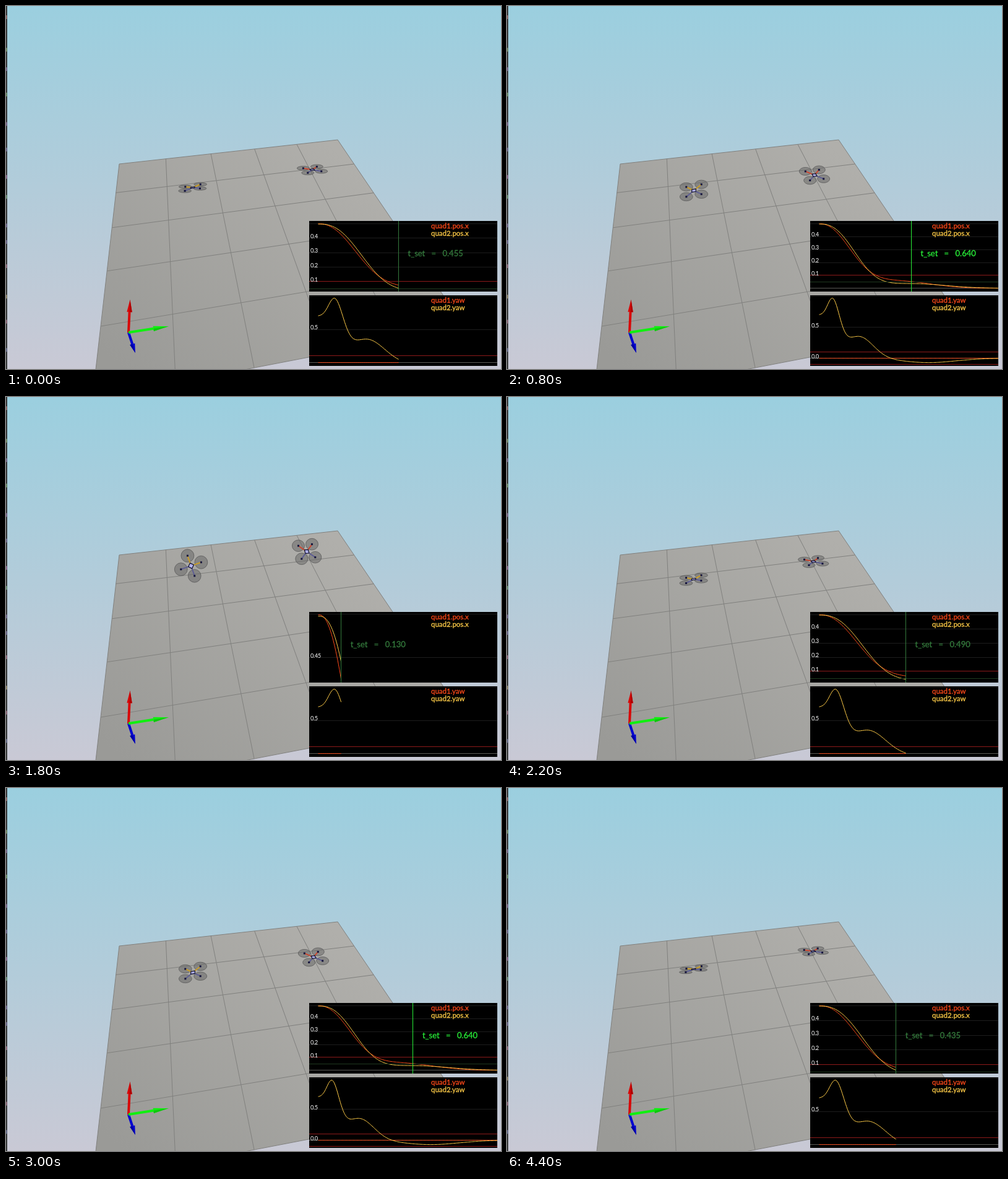
Animation, 800 px wide and 586 px high, one loop 4.5 s. Source, as an HTML page:

```html
<!DOCTYPE html>
<html lang="en">
<head>
<meta charset="utf-8">
<title>Two quadcopters settling</title>
<style>
  html, body { margin: 0; width: 100%; height: 100%; overflow: hidden; background: #9ccfe0; }
  svg { display: block; width: 800px; height: 586px; }
  text { font-family: Lato, "Open Sans", sans-serif; stroke: currentColor; fill: currentColor; stroke-width: .3px; }
  .legend { font-size: 11.5px; }
  .readout { font-size: 13px; }
  .tick { font-size: 9.3px; letter-spacing: -.4px; color: #fff; stroke: none; }
  .plot path, .plot rect { fill: none; shape-rendering: crispEdges; }
  .plot .trace { shape-rendering: auto; }
</style>
</head>
<body>
<svg viewBox="0 0 800 586">
  <defs>
    <linearGradient id="sky" x1="0" y1="0" x2="0" y2="1">
      <stop offset="0" stop-color="#9bcfdf"/>
      <stop offset="1" stop-color="#c9c9d5"/>
    </linearGradient>
    <linearGradient id="ground" gradientUnits="userSpaceOnUse" x1="520" y1="220" x2="190" y2="586">
      <stop offset="0" stop-color="#b0afab"/>
      <stop offset="1" stop-color="#9a9a97"/>
    </linearGradient>
    <clipPath id="clipPos"><rect x="490" y="347" width="304" height="114"/></clipPath>
    <clipPath id="clipYaw"><rect x="490" y="467" width="304" height="114"/></clipPath>
  </defs>
  <rect width="800" height="586" fill="url(#sky)"/>
  <rect width="2" height="586" fill="#363839"/>
  <g id="marks"></g>
  <g id="floor"></g>
  <g id="axes"></g>
  <g id="drones"></g>
  <g id="plots"></g>
</svg>
<script>
const $ = id => document.getElementById(id);
const RED = '#ff4a1a', YELLOW = '#ffcc48', GREEN = '#28f038', DIM_GREEN = '#347a3c', DARK_RED = '#8c1a1a';
const LOOP = 4500, STEP = 100, ENTER = .1, HOLD = 1.4, SETTLED = .64;

const mix = (a, b, s) => a + (b - a) * s;
const bell = (t, center, width) => Math.exp(-(((t - center) / width) ** 2));

// Response curves against simulated seconds: a fast fall plus a slow tail.
const fall = (t, scale, power) => .497 * Math.exp(-((t / scale) ** power));
const pos1 = t => fall(t, .28, 2.25) + .056 * bell(t, .55, .31);
const pos2 = t => fall(t, .301, 2.55) + .036 * bell(t, .64, .33);
const yaw1 = () => 0;
const yaw2 = t => {
  const peak = .087;
  const swing = t < peak ? mix(.695, .912, bell(t, peak, .042)) : .912 * bell(t, peak, .075);
  return swing + .355 * bell(t, .275, .14) - .07 * bell(t, .76, .27);
};

// How open the rotor discs look: dive forward, brake backward, then level.
const LEVEL = .65;
const tilt = t => LEVEL + .38 * bell(t, .12, .07) - .46 * bell(t, .39, .15);

// Each run restarts the simulation at a given moment of the loop.
const runs = [
  { at: 0, from: .455, rate: .9875 },
  { at: 1700, from: .04, rate: .9 },
  { at: 4000, from: .075, rate: .9 }
];
function simTime(ms) {
  const run = runs.filter(r => r.at <= ms).pop();
  return Math.round((run.from + run.rate * (ms - run.at) / 1000) * 200) / 200;
}

function drawMarks() {
  let seed = 7;
  const random = () => (seed = seed * 16807 % 2147483647) / 2147483647;
  let out = '';
  for (let y = 15; y < 580; y += 25 + 30 * random())
    out += `<rect y="${y}" width="1.5" height="6" fill="hsl(${360 * random()} 20% 55%)"/>`;
  $('marks').innerHTML = out;
}

function drawFloor() {
  const project = (u, v) => {
    const w = 1 + .085 * u - .4425 * v;
    return [(183 + 398.6 * u - 105.2 * v) / w, (255 - 20.6 * u + 98.7 * v) / w];
  };
  let grid = '';
  for (let i = 0; i <= 5; i++) {
    const s = i / 5;
    grid += `M${project(s, 0)}L${project(s, 1)}M${project(0, s)}L${project(1, s)}`;
  }
  const corners = [project(0, 0), project(1, 0), project(1, 1), project(0, 1)].join(' ');
  $('floor').innerHTML = `<polygon points="${corners}" fill="url(#ground)"/>
    <path d="${grid}" fill="none" stroke="#80807e"/>`;
}

function arrow(x, y, headLength, color, shade) {
  const ox = 198, oy = 527, half = 4.2, len = Math.hypot(x - ox, y - oy);
  const dx = (x - ox) / len, dy = (y - oy) / len;
  const bx = x - dx * headLength, by = y - dy * headLength;
  const nx = -dy * half, ny = dx * half;
  return `<path d="M${ox} ${oy}L${bx} ${by}" stroke="${color}" stroke-width="4"/>
    <path d="M${x} ${y}L${bx + nx} ${by + ny}L${bx - nx} ${by - ny}Z" fill="${color}"/>
    <path d="M${x} ${y}L${bx + nx} ${by + ny}L${bx} ${by}Z" fill="${shade}"/>`;
}

function drone(center, right, front, radius, ratio, color) {
  const [cx, cy] = center;
  const at = (r, f, k = 1) =>
    [cx + k * (r * right[0] + f * front[0]), cy + k * (r * right[1] + f * front[1])];
  const places = [[-1, 1], [1, 1], [1, -1], [-1, -1]];
  const each = draw => places.map(([r, f]) => draw(at(r, f), f > 0)).join('');
  const discs = each(([x, y]) =>
    `<ellipse cx="${x}" cy="${y}" rx="${radius}" ry="${radius * ratio}" fill="#606060" fill-opacity=".48" stroke="#5a5a5a" stroke-width=".8"/>`);
  const arms = each((p, isFront) =>
    `<path d="M${center}L${p}" stroke="${isFront ? color : '#5c5c96'}" stroke-width="1.8"/>`);
  const motors = each(([x, y]) =>
    `<rect x="${x - 1.5}" y="${y - 1.5}" width="3" height="3" fill="#16163c"/>`);
  const body = places.map(([r, f]) => at(r, f, .27)).join(' ');
  return discs + arms + motors + `<polygon points="${body}" fill="#b0b0ec" stroke="#10102c" stroke-width="1.2"/>`;
}

function drawDrones(t) {
  const k = tilt(t), lean = k - LEVEL;
  const go1 = 1 - pos1(t) / .5, go2 = 1 - pos2(t) / .5;

  const open = .11 + .85 * k;
  const far = drone(
    [mix(484.2, 497, go1), mix(241.2, 273, go1) + 10 * lean],
    [11, -1.25], [-3.7 + 3 * Math.max(0, lean), -11 * open], 10, open * .97, '#d0442c');

  // Yaw turns the frame in its own plane before the view flattens it.
  const angle = .58 * yaw2(t), c = Math.cos(angle), s = Math.sin(angle);
  const shear = -.17 * Math.min(1, Math.max(0, (1 - k) / (1 - LEVEL)));
  const view = (x, y) => [12.2 * x, 12.2 * (k * y + shear * x)];
  const near = drone(
    [mix(298.7, 302, go2), mix(267.8, 298, go2) + 4 * lean],
    view(c, s), view(s, -c), 10.4, k, '#d0a020');
  $('drones').innerHTML = near + far;
}

function plot({ clip, top, name, lines, hasMarker, t }) {
  const bottom = top + 114, span = Math.max(1.015, t);
  const xOf = s => 504.5 + 290 * s / span;
  const samples = [];
  for (let s = 0; s < t; s += .005) samples.push(s);
  samples.push(t);
  const values = lines.map(f => samples.map(f));
  const all = values.flat(), hi = Math.max(...all), lo = Math.min(...all);
  const scale = 104 / Math.max(hi - lo, 1e-4);
  const yOf = v => top + 4.6 + (hi - v) * scale;
  const pixel = n => Math.floor(n) + .5;
  const row = (v, color) => `<path d="M490 ${pixel(yOf(v))}H794" stroke="${color}"/>`;

  // Tick spacing alternates between powers of ten and their halves.
  let step = 1e-5;
  for (let five = true; step * scale < 14; five = !five) step *= five ? 5 : 2;
  const digits = Math.max(1, Math.ceil(-Math.log10(step) - 1e-6));
  let grid = '', ticks = '';
  for (let n = Math.floor(hi / step + .1); n * step > lo - 12 / scale; n--) {
    const v = n * step, y = yOf(v);
    grid += row(v, n === 0 ? '#5a5a56' : '#1d1d1d');
    if (y > top + 10 && y < bottom - 6)
      ticks += `<text class="tick" x="492" y="${y}">${Math.abs(v).toFixed(digits)}</text>`;
  }

  const traces = values.map((list, i) => {
    const d = list.map((v, j) => `${xOf(samples[j]).toFixed(2)} ${yOf(v).toFixed(2)}`).join('L');
    return `<path class="trace" d="M${d}" stroke="${[RED, YELLOW][i]}"/>`;
  }).join('');

  const settled = t >= HOLD;
  const limits = settled ? '' : row(ENTER, DARK_RED) + row(-ENTER, DARK_RED);
  const boxes = settled ? values.map(list => {
    const entry = list.findIndex(v => v < ENTER);
    if (entry < 1) return '';
    const x = pixel(xOf(samples[entry])), y = pixel(yOf(ENTER));
    const end = Math.min(pixel(yOf(-ENTER)), bottom - .5);
    return `<rect x="${x}" y="${y}" width="${793.5 - x}" height="${end - y}" stroke="${GREEN}"/>`;
  }).join('') : '';

  let marker = '';
  if (hasMarker) {
    const set = Math.min(t, SETTLED), x = xOf(set), color = t >= SETTLED ? GREEN : DIM_GREEN;
    const word = (text, dx) =>
      `<text class="readout" x="${x + dx}" y="${top + 57}" color="${color}">${text}</text>`;
    marker = row(.05, '#1f3a1f') + `<path d="M${pixel(x)} ${top}V${bottom}" stroke="${color}"/>`
      + word('t_set', 15) + word('=', 53) + word(set.toFixed(3), 71);
  }
  const legend = [RED, YELLOW].map((color, i) =>
    `<text class="legend" x="687" y="${top + 11.5 + 12 * i}" color="${color}">quad${i + 1}.${name}</text>`).join('');

  return `<g class="plot" clip-path="url(#${clip})">
    <rect x="490" y="${top}" width="304" height="114" style="fill:#000"/>
    ${grid}${limits}${traces}${boxes}${marker}${ticks}${legend}</g>`;
}

function drawPlots(t) {
  $('plots').innerHTML =
    plot({ clip: 'clipPos', top: 347, name: 'pos.x', lines: [pos1, pos2], hasMarker: true, t })
    + plot({ clip: 'clipYaw', top: 467, name: 'yaw', lines: [yaw1, yaw2], hasMarker: false, t });
}

let shown = -1;
function render(now) {
  const ms = Math.floor((now % LOOP) / STEP) * STEP;
  if (ms === shown) return;
  shown = ms;
  const t = simTime(ms);
  drawDrones(t);
  drawPlots(t);
}

drawMarks();
drawFloor();
$('axes').innerHTML = arrow(209, 560, 15, '#0000d0', '#0000a0')
  + arrow(200.5, 474, 20, '#d80808', '#b00000')
  + arrow(263, 517, 25, '#10f010', '#0cc80c');
render(0);
const start = performance.now();
(function tick() {
  render(Math.max(0, performance.now() - start));
  requestAnimationFrame(tick);
})();
</script>
</body>
</html>
```
